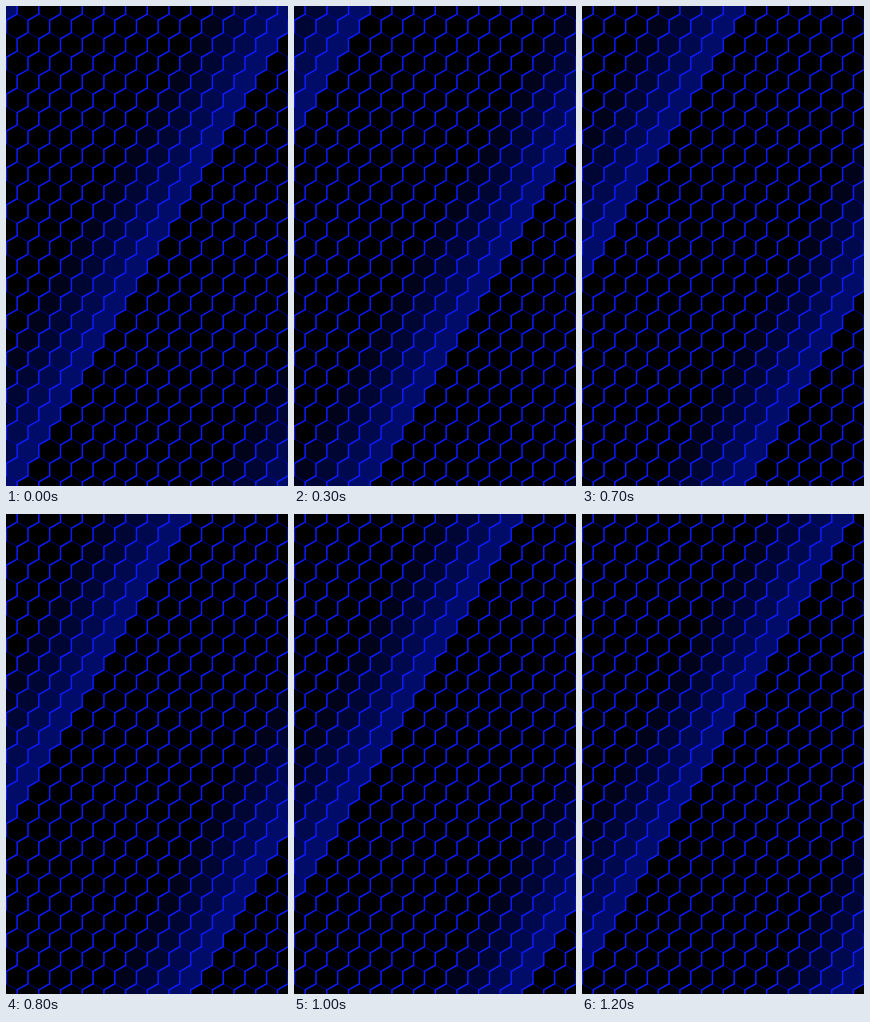
Write an HTML page with a canvas that moves like this. It is 282 px wide and 480 px high and loops after 1.3 s.

```html
<!DOCTYPE html>
<html lang="en">
<head>
<meta charset="utf-8">
<title>Hexagon sweep</title>
<style>
  html, body { margin: 0; width: 100%; height: 100%; overflow: hidden; background: #000; }
  canvas { display: block; }
</style>
</head>
<body>
<canvas id="stage" width="282" height="480"></canvas>
<script>
const ctx = document.getElementById('stage').getContext('2d');
const W = 282, H = 480, STEPS = 13, STEP_MS = 100;
const cell = W / STEPS, half = cell / 2;
const rowH = H / 26, side = rowH / 1.5;
const left0 = 0.3, top0 = 2;
const TRAIL = 4;

const mod = (n, m) => ((n % m) + m) % m;

function hexPath(m, y) {
  const p = new Path2D();
  p.moveTo(m, y - side);
  p.lineTo(m + half, y - side / 2);
  p.lineTo(m + half, y + side / 2);
  p.lineTo(m, y + side);
  p.lineTo(m - half, y + side / 2);
  p.lineTo(m - half, y - side / 2);
  p.closePath();
  return p;
}

// Each diagonal of cells has a bright staircase along its right side
const cells = [], bright = new Path2D(), dim = new Path2D();
for (let diag = -2; diag <= 27; diag++) {
  for (let row = -1; row <= 26; row++) {
    const m = left0 + cell * diag - half * row;
    const y = top0 + rowH * row;
    cells.push({ path: hexPath(m, y), diag });
    if (row < 0) bright.moveTo(m + half, y - side / 2);
    bright.lineTo(m + half, y + side / 2);
    bright.lineTo(m, y + side);
    dim.moveTo(m, y - side);
    dim.lineTo(m + half, y - side / 2);
  }
}

function stroke(path, color, width) {
  ctx.strokeStyle = color;
  ctx.lineWidth = width;
  ctx.stroke(path);
}

function paint(step) {
  ctx.fillStyle = '#000';
  ctx.fillRect(0, 0, W, H);
  ctx.fillStyle = 'rgb(0, 12, 104)';
  for (const { path, diag } of cells) {
    const age = mod(step - diag, STEPS);
    if (age >= TRAIL) continue;
    ctx.globalAlpha = 1 - age / TRAIL;
    ctx.fill(path);
  }
  ctx.globalAlpha = 1;
  stroke(dim, 'rgba(0, 8, 200, 0.45)', 1.3);
  stroke(bright, '#0c1cff', 1.5);
}

const start = performance.now();
let shown = -1;
function tick() {
  const step = Math.floor((performance.now() - start) / STEP_MS) % STEPS;
  if (step !== shown) paint(shown = step);
  requestAnimationFrame(tick);
}
tick();
</script>
</body>
</html>
```
